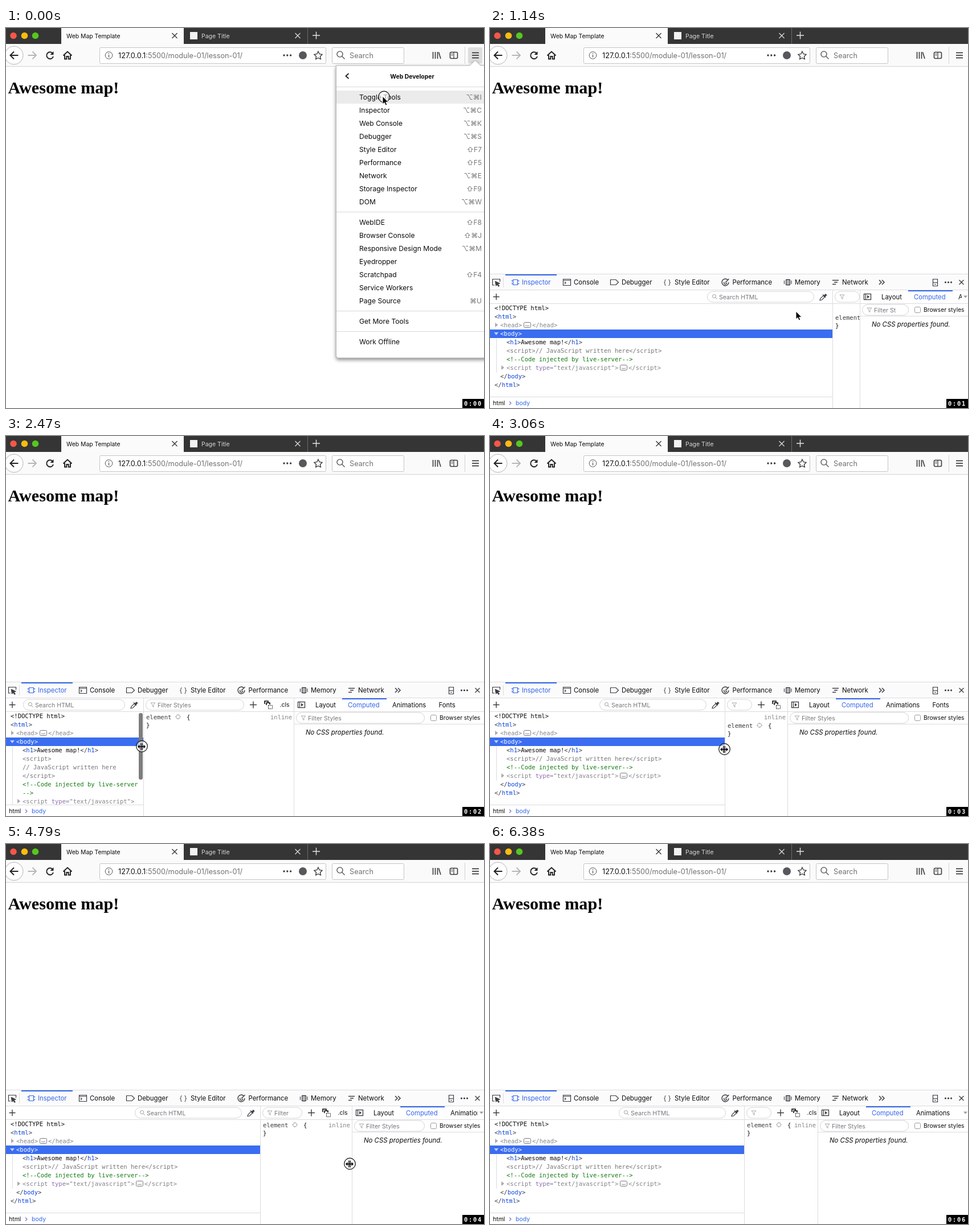
Recreate the animation shown at these times as an HTML page. Size 839 by 668 pixels, loop 6680 ms.

```html
<!DOCTYPE html>
<html lang="en">
<head>
<meta charset="utf-8">
<title>Web Map Template</title>
<style>
html, body { margin: 0; width: 100%; height: 100%; overflow: hidden; background: #fff; }
svg { display: block; overflow: hidden; }
text { font-family: Inter, "DejaVu Sans", sans-serif; white-space: pre; }
.mono { font: 10.53px "DejaVu Sans Mono", monospace; }
.clock { font: bold 10.4px "DejaVu Sans Mono", monospace; letter-spacing: 1.75px; }
.head { font: bold 30.2px "Liberation Serif", serif; }
.menu { filter: drop-shadow(0 3px 3px rgba(0,0,0,.45)); }
</style>
</head>
<body>
<svg id="stage" width="839" height="668" viewBox="0 0 839 668">
  <g id="page"></g><g id="live"></g>
</svg>
<script>
const LOOP = 6680;
const INK = '#0c0c0d', ICON = '#3b3b40', BLUE = '#3366e8', DIM = '#85858a', RULE = '#dcdcde';

// Drawing helpers
const esc = s => s.replace(/&/g, '&amp;').replace(/</g, '&lt;');
const text = (x, y, s, size, fill = INK, more = '') =>
  `<text x="${x}" y="${y}" font-size="${size}" fill="${fill}" ${more}>${esc(s)}</text>`;
const rect = (x, y, w, h, fill, more = '') =>
  `<rect x="${x}" y="${y}" width="${w}" height="${h}" fill="${fill}" ${more}/>`;
const path = (d, stroke = ICON, width = 1.2, fill = 'none') =>
  `<path d="${d}" stroke="${stroke}" stroke-width="${width}" fill="${fill}"/>`;
const dot = (x, y, r, fill, more = '') => `<circle cx="${x}" cy="${y}" r="${r}" fill="${fill}" ${more}/>`;
const dots = (x, y, gap, r) => [0, 1, 2].map(i => dot(x + i * gap, y, r, ICON)).join('');
const cross = (x, y, r, color) => path(`M${x - r} ${y - r}l${2 * r} ${2 * r}m0 ${-2 * r}l${-2 * r} ${2 * r}`, color, 1.3);
const plus = (x, y, r, color = ICON) => path(`M${x - r} ${y}h${2 * r}M${x} ${y - r}v${2 * r}`, color, 1.4);
const clip = (x, y, w, h, body) => w <= 0 ? '' :
  `<svg x="${x}" y="${y}" width="${w}" height="${h}" viewBox="${x} ${y} ${w} ${h}">${body}</svg>`;
const lens = (x, y, r, color, width) =>
  dot(x, y, r, 'none', `stroke="${color}" stroke-width="${width}"`) +
  path(`M${x + r * .7} ${y + r * .7}l${r} ${r}`, color, width);
const code = (x, y, parts, more = '') => `<text class="mono" x="${x}" y="${y + 4}" ${more}>` +
  parts.map(([s, c]) => `<tspan fill="${c}">${esc(s)}</tspan>`).join('') + '</text>';

function browser() {
  return rect(0, 0, 839, 28, '#353535') + rect(97, 0, 215, 28, '#fbfbfb') +
    rect(529, 0, 1, 28, '#6a6a6a') +
    dot(13, 13.5, 5.8, '#f4574a') + dot(32.5, 13.5, 5.8, '#fcbb12') + dot(51.5, 13.5, 5.8, '#56c71e') +
    text(106, 17.5, 'Web Map Template', 10.4) + cross(296, 13.5, 4.5, '#333') +
    rect(323, 7, 13, 13, '#f2f2f2') + text(343, 17.5, 'Page Title', 10.5, '#d6d6d6') +
    cross(512, 13.5, 4.5, '#d6d6d6') + plus(544.5, 13, 6.5, '#e4e4e4') +
    rect(0, 28, 839, 39, '#fafafa') + rect(0, 67, 839, 1, '#d4d4d4') +
    dot(14, 48, 16, '#fff', 'stroke="#b4b4b4"') +
    path('M21.5 48H8M14 41.5L7.5 48L14 54.5', '#222', 2) +
    path('M38.5 48H53M46.5 41.5L53 48L46.5 54.5', '#b6b6b8', 1.8) +
    path('M82 44.5A6 6 0 1 0 83 50', '#222', 1.9) + path('M83.5 41v6h-6z', 'none', 0, '#222') +
    path('M100.5 48.5L108 41.5L115.5 48.5M103 47.5V54.5H106.3V50H109.7V54.5H113V47.5', '#222', 1.9) +
    rect(164.5, 34.5, 397, 28, '#fff', 'rx="2" stroke="#c4c4c6"') +
    dot(180.5, 48, 6.3, 'none', 'stroke="#555"') + path('M180.5 47v4.5M180.5 44v1.5', '#555', 1.3) +
    `<text x="197" y="53" font-size="12.7" fill="#111">127.0.0.1<tspan fill="#707070">:5500/module-01/lesson-01/</tspan></text>` +
    dots(488, 48, 5.8, 1.7) + dot(521, 48, 7, '#58585c') +
    path('M548 41.2L550.2 45.7L555 46.4L551.5 49.9L552.3 54.8L548 52.5L543.7 54.8L544.5 49.9L541 46.4L545.8 45.7Z', ICON, 1.4) +
    rect(572.5, 34.5, 126, 28, '#fff', 'rx="2" stroke="#c4c4c6"') +
    lens(586, 46, 5, '#666', 1.6) + text(603, 53, 'Search', 12.7, '#737373') +
    path('M749.5 42V54M753.5 42V54M757.5 42V54M759.5 42.5L763 54', ICON, 1.6) +
    rect(779.5, 42.5, 13, 11, 'none', `rx="2" stroke="${ICON}" stroke-width="1.6"`) +
    path('M786 42V54M781.5 45.5h3M781.5 48h3', ICON, 1.2) + rect(805, 33, 1, 30, '#d4d4d4') +
    `<text class="head" x="3.5" y="115">Awesome map!</text>`;
}

const hamburger = () => path('M818 43.5H830M818 48H830M818 52.5H830', '#222', 1.7);

const MENU = [
  [121, 'Toggle Tools ⌥⌘I|Inspector ⌥⌘C|Web Console ⌥⌘K|Debugger ⌥⌘S|Style Editor ⇧F7|Performance ⇧F5|Network ⌥⌘E|Storage Inspector ⇧F9|DOM ⌥⌘W'],
  [341, 'WebIDE ⇧F8|Browser Console ⇧⌘J|Responsive Design Mode ⌥⌘M|Eyedropper|Scratchpad ⇧F4|Service Workers|Page Source ⌘U'],
  [515, 'Get More Tools'], [551, 'Work Offline']
];

function menu() {
  const items = MENU.map(([top, list]) => list.split('|').map((item, i) => {
    const [, label, keys] = item.match(/^(.*?)(?: ([⌥⌘⇧].*))?$/);
    const y = top + 23 * i + 4.5;
    return text(620, y, label, 12.1) + (keys ? text(835, y, keys, 12, '#777', 'text-anchor="end"') : '');
  }).join('')).join('');
  return rect(811, 34, 25, 28, '#dededf', 'rx="2"') +
    '<g class="menu">' + path('M579.5 66H814L823.5 57L833 66H845V580H583Q579.5 580 579.5 576Z', '#b5b5b5', 1, '#fff') + '</g>' +
    rect(580, 110, 259, 23, '#ebebeb') +
    [103, 323, 497, 533].map(y => rect(580, y, 259, 1, '#d8d8d8')).join('') +
    path('M601.5 80L596.5 84.5L601.5 89', '#222', 1.8) +
    text(713, 88.5, 'Web Developer', 10.4, INK, 'text-anchor="middle" font-weight="bold"') + items;
}

const TABS = [[56, 'Inspector'], [147, 'Console'], [231, 'Debugger'], [324, 'Style Editor'],
  [425.5, 'Performance'], [535, 'Memory'], [618, 'Network']];

function tabBar() {
  return rect(0, 432, 839, 236, '#fff') + rect(0, 432, 839, 29, '#fbfbfc') +
    rect(0, 432, 839, 1, RULE) + rect(0, 460, 839, 1, RULE) +
    TABS.map(([x, s], i) => text(x, 451, s, 11.4, i ? INK : BLUE)).join('') +
    rect(27, 433, 90, 2, BLUE) + rect(23, 438, 1, 18, RULE) +
    path('M8 452H4.5V441.5H17.5V446') + path('M9 445L17.5 449L14 450.2L16.5 453.5L14.8 454.5L12.5 451.3L10.5 453.5Z', ICON, .8, ICON) +
    path('M40.5 442.5H48.5V451.5H40.5ZM37.5 444.5H40M37.5 449.5H40M49 444.5H51.5M49 449.5H51.5', BLUE) +
    path('M128.5 441.5H141.5V452.5H128.5ZM129 443.5H141M131 446L133 448L131 450') +
    path('M211.5 442.5H221L225.5 447L221 451.5H211.5Z') + text(304.5, 451, '{ }', 11.5, ICON) +
    path('M417.5 443A6 6 0 1 0 419 447M411 446.5A2.5 2.5 0 1 0 415.5 447.5M413 447.5L419.5 441', ICON, 1.4) +
    path('M519.5 442.5H526.5V451.5H519.5ZM516.5 444V450M529 444V450M521.5 441V453M524.5 441V453', ICON, 1.1) +
    path('M601 443.5H612M604 447H610M601 450.5H607', ICON, 1.4) +
    path('M683 443L687 447L683 451M688 443L692 447L688 451', ICON, 1.5) +
    path('M777.5 441.5H785.5V453.5H777.5ZM778 447.5H785M780 450.5H783') +
    dots(799.5, 447, 5, 1.6) + cross(827.5, 447, 4, ICON);
}

const funnel = (x, y) => path(`M${x} ${y - 3.5}h8l-3 3.5v4l-2 -1.5v-2.5z`, '#aaa', 1);

function pill(x, y, w, label, icon, room = 22) {
  return rect(x + .5, y - 9.5, w - 1, 19, '#fff', 'rx="9.5" stroke="#d3d3d6"') + icon +
    clip(x + 20, y - 9, w - 20 - room, 18, text(x + 21, y + 4, label, 10.6, '#77777c'));
}

const badge = (x, y) => rect(x + .5, y - 4.5, 12, 9, '#fff', 'rx="2" stroke="#77777c"') +
  [4, 6.5, 9].map(d => dot(x + d, y + 1.5, .7, ICON)).join('');

function markup(s1) {
  const tag = (name, open = '<') => [[open, ICON], [name, '#0b45dc'], ['>', ICON]];
  const narrow = s1 < 305;
  let y = 477, out = '';
  const row = (x, parts, more) => out += code(x, y += 15, parts, more);
  const twisty = x => out += path(`M${x} ${y - 4}l5 4l-5 4z`, 'none', 0, '#aaa');

  row(8, [['<!DOCTYPE html>', INK]], 'font-style="italic"');
  row(8, tag('html'));
  row(18, [['<head>', DIM]]);
  twisty(9);
  out += badge(59, y) + code(74, y, [['</head>', DIM]]);
  out += rect(0, 530, s1, 15, '#3a6df0');
  row(18, [['<body>', '#fff']], 'font-weight="bold"');
  out += path(`M7 ${y - 2}h8l-4 5z`, 'none', 0, '#bcd0ff');
  row(29, [...tag('h1'), ['Awesome map!', INK], ...tag('h1', '</')]);
  const script = ['<script>', '// JavaScript written here', '<\/script>'];
  for (const s of narrow ? script : [script.join('')]) row(29, [[s, '#77777c']]);
  const note = '<!--Code injected by live-server';
  if (s1 < 262) {
    row(29, [[note, '#117a11']]);
    row(29, [['-->', '#117a11']]);
  } else row(29, [[note + '-->', '#117a11']]);
  row(29, [['<script ', DIM], ['type', '#9270b0'], ['="text/javascript">', DIM]]);
  twisty(20);
  if (!narrow) out += badge(228, y) + code(243, y, [['<\/script>', DIM]]);
  else y += 15;
  row(18, tag('body', '</'));
  out += rect(11, 546, 1, y - 552, RULE);
  row(8, tag('html', '</'));
  if (narrow) out += rect(s1 - 8, 487, 7, 117, '#7d7d7d', 'rx="3"');

  const x = Math.max(30, s1 - 220), p = s1 - 16;
  return plus(11, 472.5, 5.5) + pill(x, 472.5, s1 - 32 - x, 'Search HTML', lens(x + 12.5, 471.5, 3, '#999', 1)) +
    path(`M${p - 6} 478.5l1 -3l5 -5l2.5 2.5l-5 5zM${p - 1} 468.5l5 5`, ICON, 1.1) +
    path(`M${p + 1} 470.5l3 -3l2 2l-3 3z`, ICON, 1, ICON) +
    clip(0, 485, s1, 163, out) + rect(0, 648, s1, 1, RULE) +
    text(5, 663, 'html', 10.5) + path('M34 656.5L37 659.5L34 662.5', '#7272d0', 1.1) + text(45, 663, 'body', 10.5, BLUE);
}

function rules(s1, s2) {
  const w = Math.max(44, s2 - s1 - 91), end = s1 + 4 + w;
  const wrap = s2 - s1 < 125, y = wrap ? 508.5 : 493.5, g = s1 + 61;
  return clip(s1, 461, s2 - s1, 207,
    pill(s1 + 4, 472.5, w, 'Filter Styles', funnel(s1 + 13, 472.5)) + plus(end + 16, 472.5, 6) +
    path(`M${end + 36} 471v-5h6v3M${end + 39} 473v-4h6v3`, INK, 1.6) +
    rect(end + 42.5, 473.5, 7, 6, '#fff', 'stroke="#222" stroke-dasharray="2 1"') +
    text(end + 62.5, 476, '.cls', 10.5) +
    code(Math.max(s2 - 41, s1 + 56), 493.5, [['inline', '#85858a']]) +
    code(s1 + 5, y, [['element', ICON]]) +
    rect(g - 3, y - 3, 6, 6, 'none', 'rx="1" stroke="#aaa"') +
    path(`M${g} ${y - 5}v2M${g} ${y + 3}v2M${g - 5} ${y}h2M${g + 3} ${y}h2`, '#aaa', 1) +
    code(s1 + 76, y, [['{', INK]]) + code(s1 + 5, y + 14.5, [['}', INK]]));
}

function sidebar(s2) {
  const full = s2 > 540;
  const tabs = [[38, 'Layout'], [95, 'Computed'], [173, 'Animations'], [254.5, 'Fonts']]
    .map(([dx, s], i) => text(s2 + dx, 476.5, s, 11.3, i === 1 ? BLUE : INK)).join('');
  return clip(s2, 461, (full ? 828 : 839) - s2, 23, tabs + rect(s2 + 85, 461, 78, 2, BLUE)) +
    (full ? path('M831 470.5h7l-3.5 4z', 'none', 0, '#999') : '') +
    rect(s2 + 7.5, 467.5, 12, 10, 'none', `stroke="${ICON}" stroke-width="1.3"`) +
    path(`M${s2 + 10.5} 467v11`) + path(`M${s2 + 13} 469.5l4 3l-4 3z`, 'none', 0, ICON) +
    pill(s2 + 4, 495.5, 731 - s2, 'Filter Styles', funnel(s2 + 13, 495.5)) +
    rect(745.5, 490.5, 10, 10, '#fff', 'rx="2" stroke="#9a9a9a"') +
    text(761, 499.3, 'Browser styles', 10.25) + rect(s2, 506, 839 - s2, 1, RULE) +
    text(s2 + 21, 524.5, 'No CSS properties found.', 11.4, INK, 'font-style="italic"');
}

function tools(s1, s2) {
  return tabBar() + markup(s1) + rules(s1, s2) + sidebar(s2) +
    rect(0, 484, 839, 1, RULE) + rect(s1, 461, 1, 207, RULE) + rect(s2, 461, 1, 207, RULE);
}

function pointer(x, y, resize, pressed) {
  const ring = pressed ? dot(x + (resize ? .5 : 2.5), y + (resize ? -.5 : 1), 9.8, 'rgba(255,255,255,.6)', 'stroke="#111" stroke-width="1.2"') : '';
  const shape = resize
    ? path('M-1.2 -6V6M1.2 -6V6M-6 0H6', '#fff', 3) + path('M-1.2 -6V6M1.2 -6V6M-6 0H6', '#000', 1.4) +
      path('M-7 0l3.5 -3.5v7zM7 0l-3.5 -3.5v7z', 'none', 0, '#000')
    : path('M0 0V14L3.2 11.2L5.4 16L7.8 15L5.7 10.3H10Z', '#fff', 1, '#000');
  return `${ring}<g transform="translate(${x} ${y})">${shape}</g>`;
}

// Motion: keys are [time, ...values], eased between neighbours
const CURSOR = [[290, 661, 120], [1140, 537, 498], [1440, 600, 545], [1590, 600, 545], [2320, 238, 546],
  [2620, 238, 546], [3215, 446, 552], [3510, 526, 571], [3660, 526, 571], [3960, 528, 566], [4060, 528, 566],
  [4790, 603, 562.5], [4940, 603, 562.5], [5240, 573, 562], [5530, 810, 409], [5680, 797, 505]];
const SPLIT = [[1590, 601, 649], [2320, 241, 505], [2620, 241, 505], [3215, 446, 525], [3960, 446, 525],
  [4790, 446, 607], [4940, 446, 607], [5240, 446, 575]];

function along(keys, t) {
  const i = keys.findIndex(k => k[0] > t);
  if (i === 0) return keys[0].slice(1);
  if (i < 0) return keys[keys.length - 1].slice(1);
  const a = keys[i - 1], b = keys[i], k = (t - a[0]) / (b[0] - a[0]), e = k * k * (3 - 2 * k);
  return a.slice(1).map((v, j) => v + (b[j + 1] - v) * e);
}

const BEATS = [[0, 0, 1], [150, 1140, 8], [1290, 2320, 8], [2470, 3510, 8], [3660, 3660, 1], [3960, 3960, 1],
  [4060, 4940, 7], [5090, 5680, 5], [5980, 6380, 4]].flatMap(([a, b, n]) =>
  Array.from({ length: n }, (_, i) => Math.round((a + (b - a) * i / Math.max(1, n - 1)) / 10) * 10));
const within = (t, ...spans) => spans.some(([a, b]) => t >= a && t < b);

const live = document.getElementById('live');
document.getElementById('page').innerHTML = browser();

function draw(t) {
  const [s1, s2] = along(SPLIT, t).map(Math.round);
  const [x, y] = along(CURSOR, t);
  const resize = within(t, [1440, 3250], [3450, 5260]);
  const pressed = within(t, [0, 150], [1590, 3215], [3660, 5240]);
  live.innerHTML = (t < 290 ? menu() : '') + hamburger() + (t >= 570 ? tools(s1, s2) : '') +
    (t < 5980 ? pointer(x, y, resize, pressed) : '') +
    rect(801, 652, 38, 16, '#000') +
    `<text class="clock" x="804" y="663.7" fill="#fff">0:0${Math.floor(t / 1000)}</text>`;
}

let shown = -1;
const start = performance.now();
function tick() {
  const t = (performance.now() - start) % LOOP;
  const beat = BEATS.filter(b => b <= t).pop();
  if (beat !== shown) draw(shown = beat);
  requestAnimationFrame(tick);
}
tick();
</script>
</body>
</html>
```
